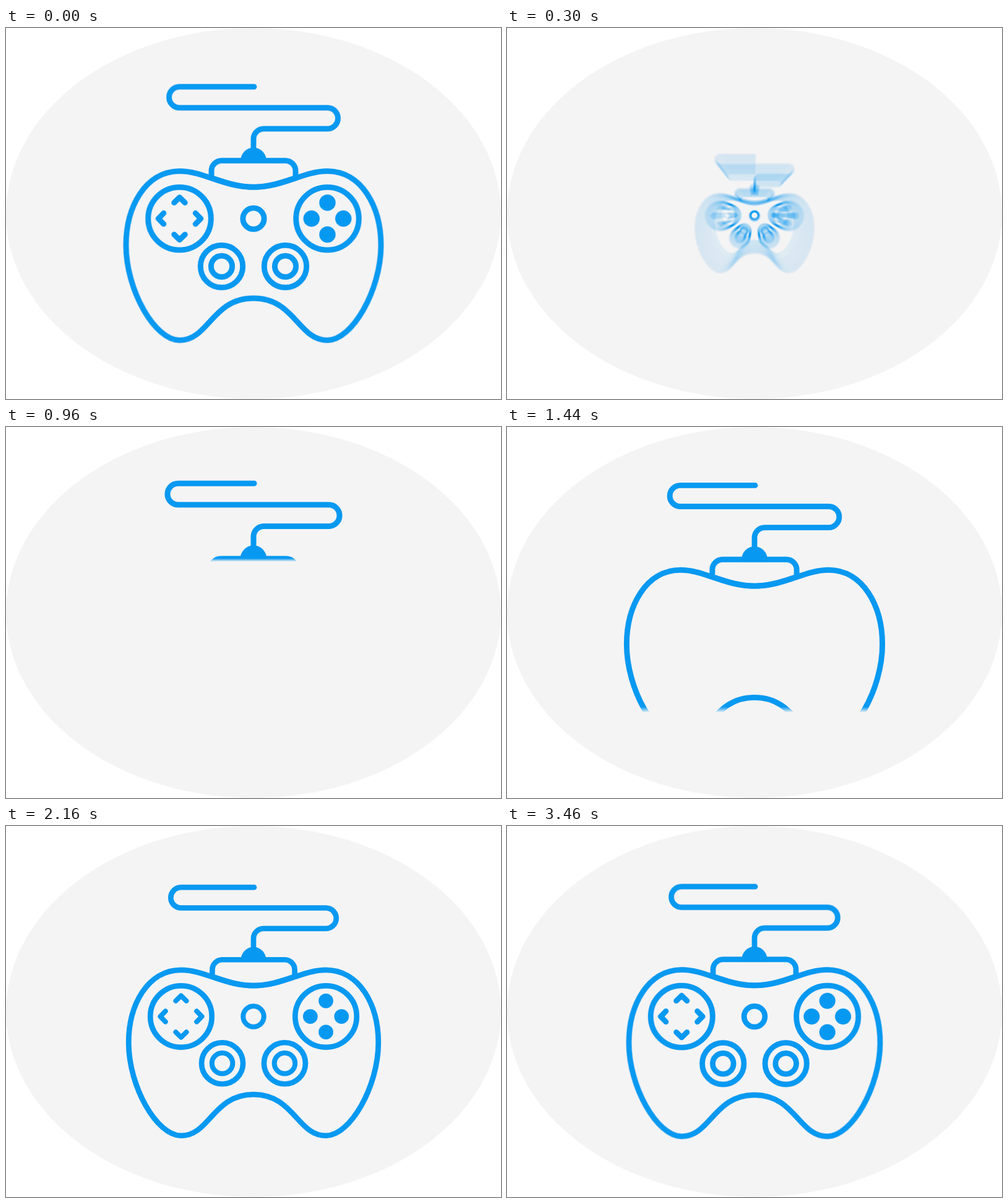
An HTML page with a canvas that plays this animation: 800x600 px, repeating every 3.49 s.

```html
<!DOCTYPE html>
<html lang="en">
<head>
<meta charset="utf-8">
<title>Game controller</title>
<style>
  html, body { margin: 0; width: 100%; height: 100%; overflow: hidden; background: #fff; }
  canvas { display: block; }
</style>
</head>
<body>
<canvas id="stage" width="800" height="600"></canvas>
<script>
const LOOP = 3490, STEP = 30, SHUTTER = 15, SAMPLES = 16;
const REST = 2430, LEAVE = 3460, TURN = 210, GONE = 360;
const BLUE = '#0799f1', GREY = '#f4f4f4', LINE = 8.6;

const stage = document.getElementById('stage').getContext('2d');
const layer = document.createElement('canvas');
layer.width = 800;
layer.height = 600;
const ctx = layer.getContext('2d');

const clamp = v => Math.min(1, Math.max(0, v));
const progress = (t, from, to) => clamp((t - from) / (to - from));
const smooth = v => v * v * (3 - 2 * v);

function circles(...list) {
  const path = new Path2D();
  for (const [x, y, r] of list) {
    path.moveTo(x + r, y);
    path.arc(x, y, r, 0, Math.PI * 2);
  }
  return path;
}

const cable = new Path2D(`M401 101H284a16.5 16.5 0 0 0 0 33H516a16.5 16.5 0 0 1 0 33
  H416a16 16 0 0 0 -16 16V212
  M334 244V233a16 16 0 0 1 16 -16H450a16 16 0 0 1 16 16V244
  C445 251 424 258.5 400 258.5S355 251 334 244`);
const dome = new Path2D('M379.5 218a20.5 21.5 0 0 1 41 0z');
const body = new Path2D(`M400 258.5C352 258.5 322 233.5 284 233.5C230 233.5 200 290 200 350
  C200 420 245 499 284 499C330 499 335 433 400 433C465 433 470 499 516 499
  C555 499 600 420 600 350C600 290 570 233.5 516 233.5C478 233.5 448 258.5 400 258.5z`);
const rings = circles([284, 308, 49.3], [516, 308, 49.3], [350, 383, 33.2], [450, 383, 33.2]);
const details = circles([400, 308, 16.6], [350, 383, 16.6], [450, 383, 16.6]);
details.addPath(new Path2D(`M275.5 283l8.5 -8.3l8.5 8.3M275.5 333l8.5 8.3l8.5 -8.3
  M259 299.5l-8.3 8.5l8.3 8.5M309 299.5l8.3 8.5l-8.3 8.5`));

function scaleAt(t) {
  if (t < TURN) return 1 + 0.0005 * (t + 60);
  if (t < GONE) return 1.135 * (1 - smooth(progress(t, TURN, GONE)));
  return 1 + 0.0000335 * Math.max(0, REST - t);
}

function stroke(path, width = LINE) {
  if (width <= 0) return;
  ctx.lineWidth = width;
  ctx.stroke(path);
}

// Reveals a drawing from the top down to the given height
function wipe(bottom, draw) {
  ctx.save();
  ctx.beginPath();
  ctx.rect(0, 0, 800, bottom);
  ctx.clip();
  draw();
  ctx.restore();
}

function drawController(t) {
  const leaving = t < GONE;
  const phase = (from, to) => leaving ? 1 : progress(t, from, to);
  const scale = scaleAt(t);
  if (scale <= 0) return;

  ctx.save();
  ctx.translate(400, 300);
  ctx.scale(scale, scale);
  ctx.translate(-400, -300);
  ctx.strokeStyle = ctx.fillStyle = BLUE;
  ctx.lineCap = ctx.lineJoin = 'round';

  wipe(96 + 168 * phase(365, 1080) ** 1.7, () => {
    stroke(cable);
    ctx.fill(dome);
  });
  wipe(228 + 276 * phase(1075, 1525), () => stroke(body));
  stroke(rings, LINE * smooth(phase(1525, 1860)));

  const grow = smooth(phase(1882, 2220));
  stroke(details, LINE * grow);
  const r = 12.8 * grow;
  ctx.fill(circles([516, 283, r], [516, 333, r], [491, 308, r], [541, 308, r]));
  ctx.restore();
}

function drawScene(t) {
  ctx.fillStyle = '#fff';
  ctx.fillRect(0, 0, 800, 600);
  ctx.fillStyle = GREY;
  ctx.beginPath();
  ctx.ellipse(400, 300, 400, 300, 0, 0, Math.PI * 2);
  ctx.fill();
  drawController(t);
}

// Averages several moments within the shutter time for motion blur
function render(t) {
  for (let i = 0; i < SAMPLES; i++) {
    drawScene(t + SHUTTER * ((i + 0.5) / SAMPLES - 0.5));
    stage.globalAlpha = 1 / (i + 1);
    stage.drawImage(layer, 0, 0);
  }
}

let shown = null;
function tick() {
  const now = performance.now() % LOOP;
  const t = now >= LEAVE ? LEAVE - LOOP : Math.min(REST, Math.floor(now / STEP) * STEP);
  if (t !== shown) {
    if (t === REST) {
      stage.globalAlpha = 1;
      drawScene(t);
      stage.drawImage(layer, 0, 0);
    } else {
      render(t);
    }
    shown = t;
  }
  requestAnimationFrame(tick);
}
tick();
</script>
</body>
</html>
```
